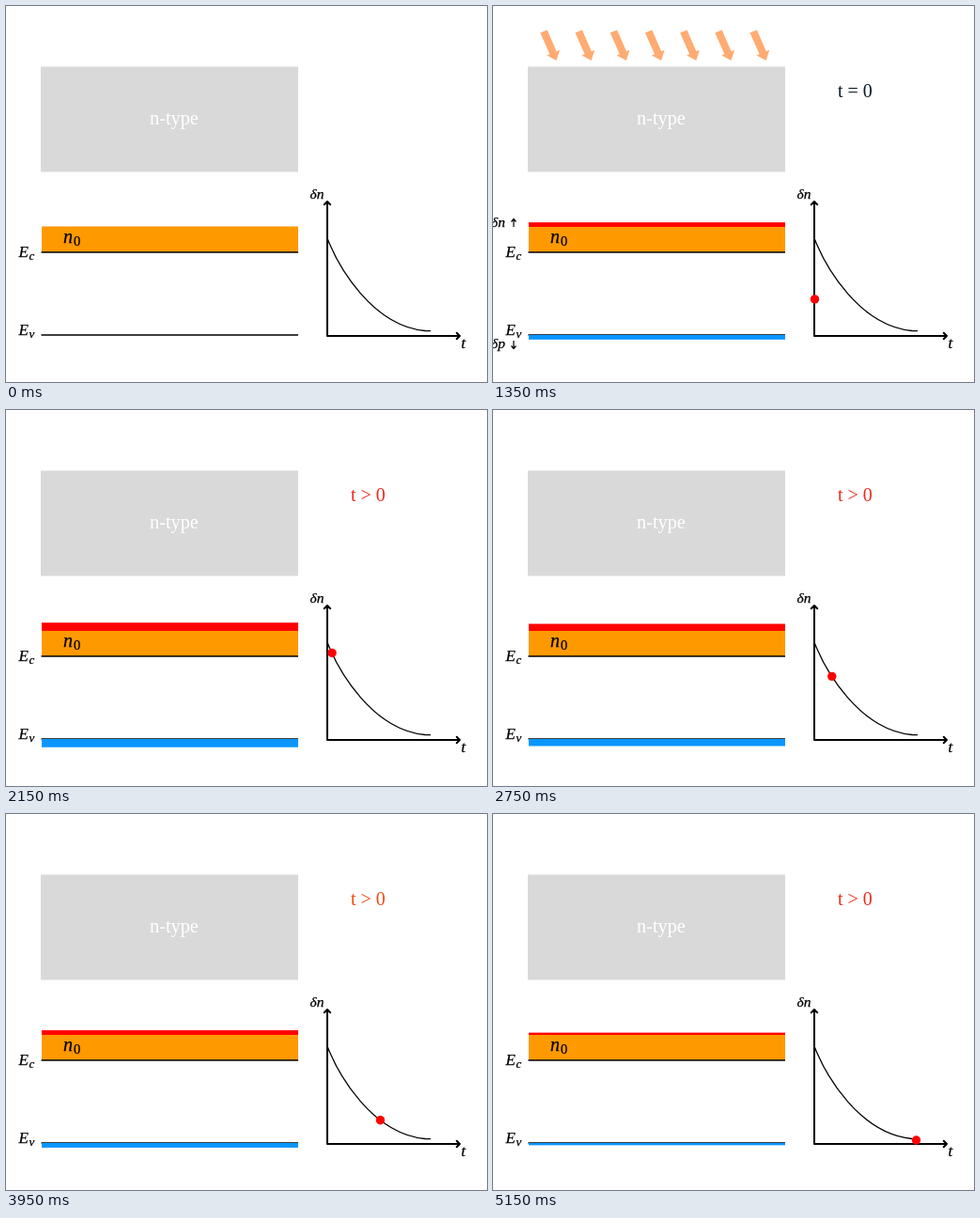
Write an HTML page that moves like this. It is 512 by 400 pixels and loops after 5.2 s.

```html
<!DOCTYPE html>
<html lang="en">
<head>
<meta charset="utf-8">
<title>Carrier decay in n-type material</title>
<style>
  html, body { margin: 0; width: 100%; height: 100%; overflow: hidden; background: #fff; }
  svg { display: block; width: 512px; height: 400px; }
  text { font-family: "Liberation Serif", "Times New Roman", serif; font-size: 20px; }
  .math text { font-size: 17px; font-style: italic; stroke: #000; stroke-width: .25; }
  .math .sub { font-size: 13px; }
  .math .small { font-size: 15.5px; }
  .axis { fill: none; stroke: #000; stroke-width: 2; stroke-linecap: round; stroke-linejoin: round; }
</style>
</head>
<body>
<svg viewBox="0 0 512 400">
  <rect x="37" y="64.5" width="274" height="112" fill="#d9d9d9"/>
  <text x="153" y="126" fill="#fff" style="font-size:20.3px">n-type</text>

  <rect x="38" y="234.5" width="273" height="27.5" fill="#ff9900"/>
  <path d="M37.5 262H311M37.5 350H311" stroke="#000" stroke-width="1.6"/>
  <g id="bars">
    <rect id="red" x="38" width="273" fill="#f00"/>
    <rect id="blue" x="38" y="350" width="273" fill="#0a96ff"/>
  </g>

  <g class="math">
    <text x="13.5" y="267">E</text><text class="sub" x="24.5" y="270">c</text>
    <text x="13.5" y="350">E</text><text class="sub" x="24.5" y="353">v</text>
    <text x="61" y="252" style="font-size:20px">n</text>
    <text x="72" y="255" style="font-size:14.5px;font-style:normal">0</text>
    <text class="small" x="323.5" y="205">δn</text>
    <text x="484.5" y="364">t</text>
    <g id="labels">
      <text class="small" x="-2" y="235">δn</text>
      <text class="small" x="-2" y="364">δp</text>
      <path d="M22 235V227M19.5 229.5L22 226.5L24.5 229.5M22 356V364M19.5 361.5L22 364.5L24.5 361.5"
            fill="none" stroke="#000" stroke-width="1.2"/>
    </g>
  </g>

  <path class="axis" d="M342 351V208M338.8 211.2L342 208L345.2 211.2M342 351H483M479.8 347.8L483 351L479.8 354.2"/>
  <path d="M342 247C354 278 390 340 446 345.5L452 345.7" fill="none" stroke="#000" stroke-width="1.3"/>
  <path id="track" d="M342.5 247.5C354 278 390 340 446 345.5L450.5 347" fill="none"/>

  <g id="arrows"></g>
  <text id="clock" x="367" y="97"></text>
  <circle id="dot" r="4.7" fill="#f00"/>
</svg>
<script>
  const LOOP = 5200, STEP = 50;
  const LIGHT = 1000, RISE = 1050, PEAK = 1900, DARK = 2000, UNLABEL = 2100, END = 5150;
  const $ = id => document.getElementById(id);
  const [bars, red, blue, labels, track, arrows, clock, dot] =
    ["bars", "red", "blue", "labels", "track", "arrows", "clock", "dot"].map($);
  const trackLength = track.getTotalLength();
  const clamp = v => Math.min(1, Math.max(0, v));
  const show = (el, on) => el.setAttribute("visibility", on ? "visible" : "hidden");
  const set = (el, attrs) => { for (const k in attrs) el.setAttribute(k, attrs[k]); };

  for (let i = 0; i < 7; i++) {
    const p = document.createElementNS("http://www.w3.org/2000/svg", "path");
    set(p, {
      d: "M50.3 28.5L57.7 25.4L67.6 48.2L71 46.8L67.5 58L57.2 52.6L60.4 51.2Z",
      transform: `translate(${i * 37.2} 0)`
    });
    arrows.append(p);
  }

  function draw(t) {
    const lit = t >= LIGHT, dark = t >= DARK;
    const rise = clamp((t - RISE) / (PEAK - RISE));
    const fall = clamp((t - PEAK) / (END - PEAK));

    show(arrows, lit && !dark);
    arrows.setAttribute("fill", t < 1350 ? "#ffc60a" : "#ffab72");
    show(labels, t >= RISE && t < UNLABEL);

    show(clock, lit);
    clock.textContent = dark ? "t > 0" : "t = 0";
    const warm = t > 3100 && t < 4800;
    clock.setAttribute("fill", !dark ? "#0b1a26" : warm ? "#f04a12" : "#ee2a20");

    show(bars, lit);
    const h = 2.4 + 6.9 * (rise - fall);
    set(red, { y: 235 - h, height: h });
    set(blue, { height: h });

    show(dot, lit);
    const p = t < PEAK
      ? { x: 342.5, y: 347 - 99.5 * rise }
      : track.getPointAtLength(fall * trackLength);
    set(dot, { cx: p.x, cy: p.y });
  }

  const start = performance.now();
  function frame() {
    const t = (performance.now() - start) % LOOP;
    draw(Math.floor(t / STEP) * STEP);
    requestAnimationFrame(frame);
  }
  frame();
</script>
</body>
</html>
```
